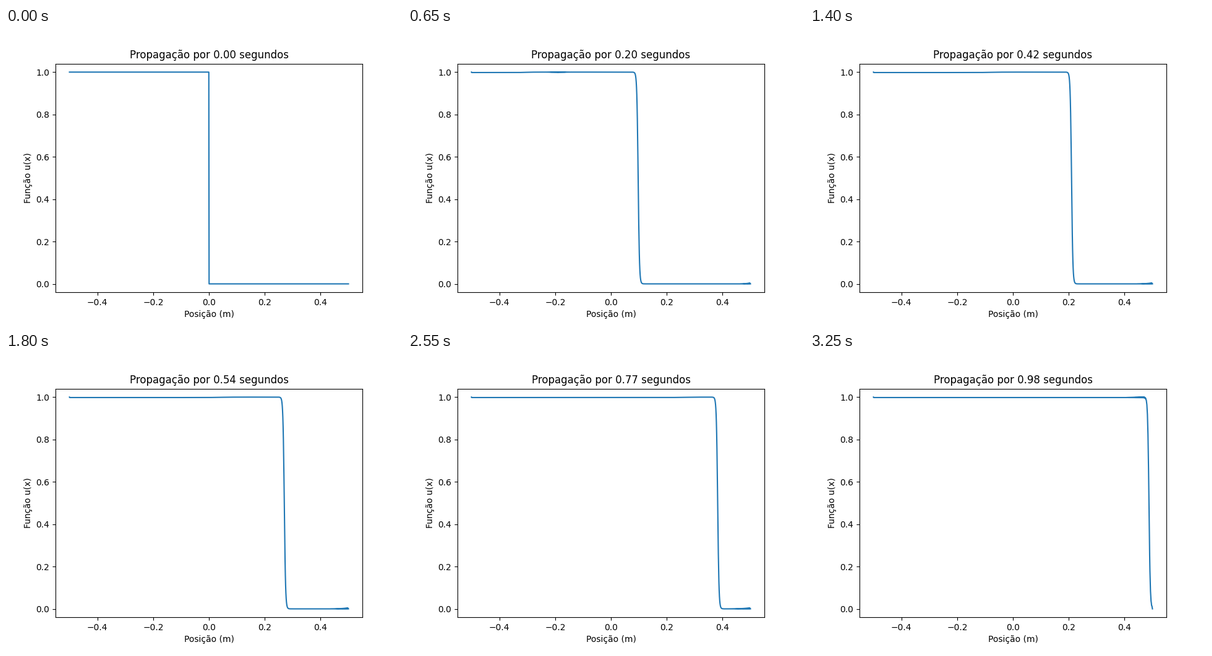
These frames come from a looping animation (640x480 px, 3300 ms). A matplotlib script:

```python
import numpy as np
import matplotlib.pyplot as plt
from matplotlib.animation import FuncAnimation

FRAMES = 66
DT = 0.015       # simulated seconds per frame
NU = 0.001       # viscosity
WIDTH = 0.0023   # shock thickness

x = np.linspace(-0.5, 0.5, 1000)
odd = np.arange(x.size) % 2
zigzag = 2 * odd - 1


def falloff(z):
    """Close stand-in for erfc(z)."""
    return 1 - np.tanh(1.2 * z)


def profile(t):
    """Travelling Burgers shock with the ripples of a leapfrog scheme."""
    if t == 0:
        return np.where(x < 0, 1.0, 0.0)
    spread = np.sqrt(4 * NU * t)
    shock = 0.5 * (1 - np.tanh((x - t / 2) / (2 * WIDTH)))

    # slight drop entering from the left edge at speed 1
    u = shock * (1 - 0.001 * falloff((x + 0.5 - t) / spread))
    # fading ripple packet moving left
    amp = 0.0032 * np.exp(-14 * (t - 0.105))
    u += shock * zigzag * min(amp, 0.008) * np.exp(-((x + t - 0.005) / spread) ** 2)
    # ripple spreading from the right edge
    u += (1 - shock) * odd * 0.004 * falloff((0.5 - x) / spread)
    # ripple thrown back as the shock reaches the edge
    if t > 0.917:
        u += shock * zigzag * 0.0018 * np.clip((x - 1.375 + t) / 0.075, 0, 1)

    u[0], u[-1] = 1, 0
    return u


fig, ax = plt.subplots(figsize=(6.4, 4.8), dpi=100)
line, = ax.plot(x, profile(0))
ax.set_xlim(-0.55, 0.55)
ax.set_ylim(-0.04, 1.04)
ax.set_xlabel("Posição (m)")
ax.set_ylabel("Função u(x)")
title = ax.set_title("")


def update(i):
    t = i * DT
    line.set_ydata(profile(t))
    title.set_text(f"Propagação por {t + 1e-9:.2f} segundos")
    return line, title


anim = FuncAnimation(fig, update, frames=FRAMES, interval=50, repeat=True)
plt.show()
```
